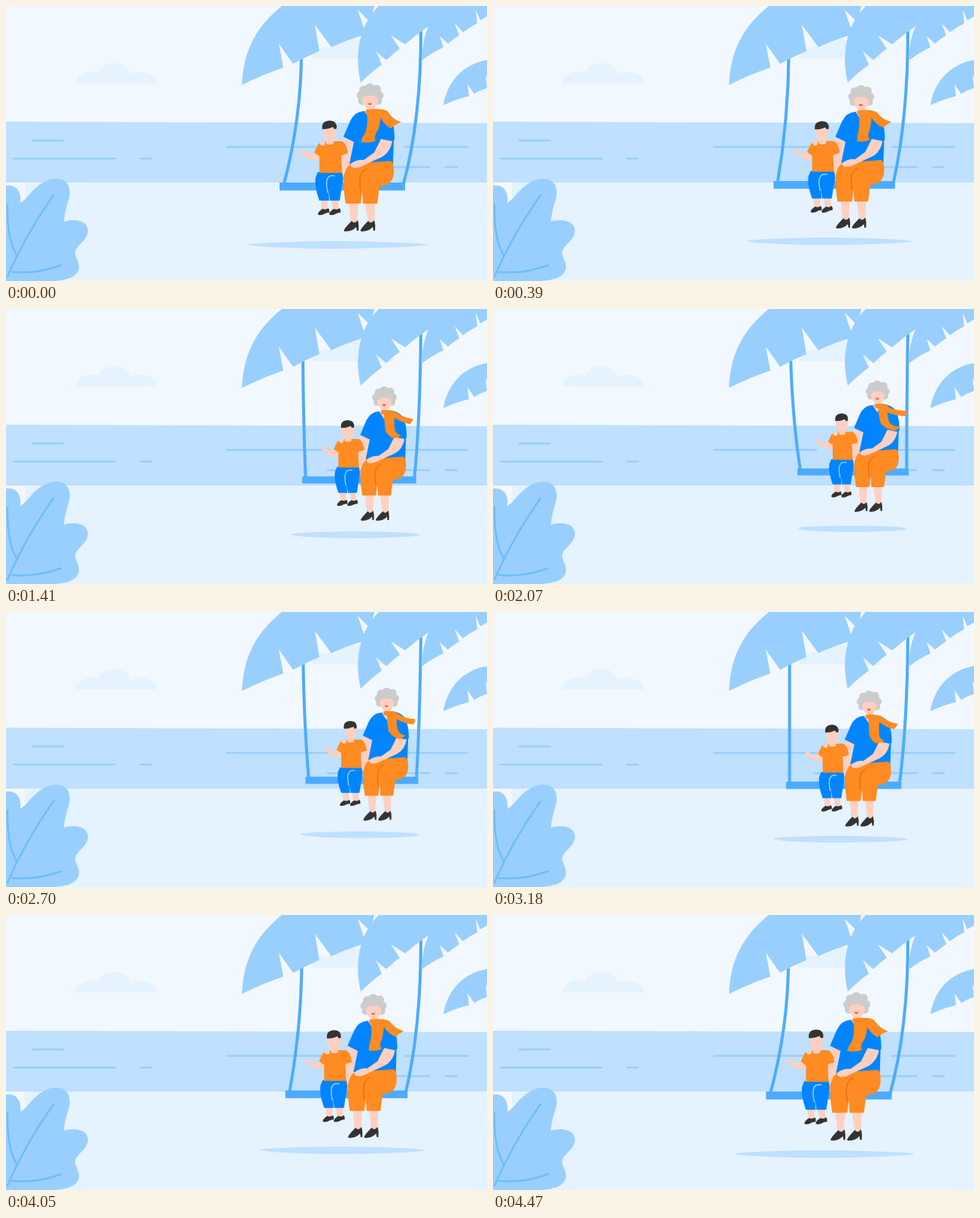
Write an HTML page that moves like this. It is 640x366 px and loops after 4.5 s.

```html
<!DOCTYPE html>
<html lang="en">
<head>
<meta charset="utf-8">
<title>Swing by the sea</title>
<style>
html, body { margin: 0; width: 100%; height: 100%; overflow: hidden; background: #f2f8ff; }
svg { display: block; width: 640px; height: 366px; }
.line { fill: none; stroke-linecap: round; stroke-width: 2.5; }
.sand { fill: #e5f2ff; }
.sea { fill: #bfe0ff; }
.leaf { fill: #99cfff; }
.rope { fill: none; stroke: #4dabff; stroke-width: 4; }
.skin { fill: #ffd0c0; }
.blue { fill: #0085ff; }
.orange { fill: #ff8b22; }
.dark { fill: #333; }
.grey { fill: #ccc; }
</style>
</head>
<body>
<svg viewBox="0 0 640 366">
  <defs>
    <path id="cloud" class="sand" d="M92 103Q94 93 102 90Q113 84 122 90Q128 76 144 76Q161 76 166 91Q176 85 187 89Q200 92 201 103Z"/>
    <path id="pump" class="dark" d="M450 298Q451 295 460 286Q464 291 468 285Q470 291 469 299H467L466 294Q461 300 452 300Q449 300 450 298Z"/>
    <path id="shoe" class="dark" d="M415 277Q415 274 421 270Q426 272 429 269Q431 272 430 275Q427 275 425 276Q420 279 416 278Z"/>
  </defs>

  <use href="#cloud"/>
  <use href="#cloud" x="315" y="-33"/>
  <path class="sea" d="M0 154L640 156V235H0Z"/>
  <path class="sand" d="M25 235H640V366H0V262H25Z"/>
  <path class="line" stroke="#99cfff" d="M35 179H76M10 203H145M179 203H193M294 187.500H430M531 187.500H614M428 214.500H563M585 214.500H600"/>

  <path id="shadow" class="sea"/>
  <path id="ropeL" class="rope"/>
  <path id="ropeR" class="rope"/>

  <g class="leaf">
    <path d="M314 105C316 60 332 28 367 0H490L485 22L468 5L479 38Q455 44 433 55L411 25L417 60Q400 67 382 77L363 50L369 82Q342 91 314 105Z"/>
    <path d="M472 102C463 65 470 25 496 0H640V14L631 19L625 5L627 23Q617 28 608 35L597 23L603 39Q595 44 588 50L577 40L582 55Q567 62 554 72Q553 48 562 27Q546 38 531 51L512 39L524 57Q515 63 506 72L492 60L500 78Q486 88 472 102Z"/>
    <path d="M582 132C587 101 608 77 640 72V96L638 92L640 109Q631 112 623 117L614 104L616 120Q599 124 582 132Z"/>
    <path d="M0 239C14 237 21 247 19 262C29 257 38 237 58 231C80 225 89 240 83 259Q78 274 77 287C92 282 109 286 109 299C108 314 92 318 92 329C93 337 98 341 97 349C95 361 82 364 66 366H0Z"/>
  </g>
  <path class="line" stroke="#70bcff" d="M63 252Q25 306 2 360M2 264Q1 311 15 333M8 354Q41 357 73 345"/>

  <!-- Drawn at its largest, with the seat's left end at 364,240 -->
  <g id="swing">
    <path fill="#4dabff" d="M364 235H531V245.500H364Z"/>

    <path class="skin" d="M450 174L463 180L458 196L464 210L455 218L447 227L445 223L451 205Z"/>
    <path class="skin" d="M456 262H469L467 289Q463 294 459 289ZM478 262H491L490 289Q486 294 482 289Z"/>
    <use href="#pump"/>
    <use href="#pump" x="22"/>
    <path class="blue" d="M475 140Q464 141 458 153L449 174L463 181L457 210H515L516 179L517 178Q517 154 509 145Q502 139 492 138Z"/>
    <path class="orange" d="M459 210Q451 215 449 229Q449 247 452 263H472L474 246L475 263H494L497 240C512 239 517 231 516 216Q516 209 512 206Z"/>
    <path class="line" stroke="#e5740f" style="stroke-width:1.500" d="M472 248C469 229 471 221 480 217"/>
    <path class="skin" d="M499 177L514 180Q511 195 500 201L476 212Q468 217 461 215Q456 213 460 209Q468 204 476 205L490 195Z"/>
    <path class="skin" d="M479 131H490V140L484 151L477 140L480 138Z"/>
    <g class="grey">
      <circle cx="484.500" cy="117" r="12"/><circle cx="484" cy="110" r="7"/><circle cx="476" cy="112" r="6"/>
      <circle cx="493" cy="111" r="6"/><circle cx="472" cy="119" r="5.500"/><circle cx="497" cy="119" r="5.500"/>
      <circle cx="474" cy="126" r="5.500"/><circle cx="495" cy="126" r="5.500"/>
    </g>
    <path class="skin" d="M474 124Q477 119 484 119Q492 119 495 124Q495 136 485 137Q475 136 474 124Z"/>
    <path fill="#ee5a3c" d="M481 129Q484 130 487 129Q486 132 484 132Q482 132 481 129Z"/>
    <path id="tail" class="orange"/>
    <path id="wing" class="orange"/>

    <path class="skin" d="M418 204Q410 207 404 204L394 198Q391 194 393 192Q397 191 400 195L408 198L411 191L420 195Z"/>
    <path class="skin" d="M446 196L455 194Q456 210 449 226Q446 230 444 226L447 211Z"/>
    <path class="skin" d="M419 258H428V271Q423 274 420 271ZM433 258H442L443 270Q438 274 435 271Z"/>
    <use href="#shoe"/>
    <use href="#shoe" x="15"/>
    <path class="blue" d="M415 221H447Q450 230 447 239L444 259H431L429 245L430 259H417Q410 240 412 228Z"/>
    <path class="line" stroke="#99cfff" style="stroke-width:1.500" d="M437 226C426 224 425 234 428 248"/>
    <path class="orange" d="M422 180Q416 181 414 187L410 195L417 200V222H447L446 199L455 196Q453 183 447 180Z"/>
    <path class="skin" d="M417 183Q419 179 425 180L424 185Q420 188 417 183Z"/>
    <path class="skin" d="M422 161H440Q440 175 436 178V183Q431 186 426 183V178Q421 174 422 161Z"/>
    <path class="dark" d="M421 164Q419 153 431 152.500Q441 153 440 163L437 164L435 161Q429 164 421 164Z"/>
  </g>
</svg>
<script>
const PERIOD = 4500, STEP = 30;
const $ = id => document.getElementById(id);
const setPath = (id, d) => $(id).setAttribute('d', d);

// Blends two paths that share the same commands.
function blend(a, b, k) {
  const ends = b.match(/\d+/g);
  return a.replace(/\d+/g, n => +n + (ends.shift() - n) * k);
}

// Runs 0 to 1 and back at even speed; low and high are the turning times.
function triangle(t, low, high) {
  const p = (t - low + PERIOD) % PERIOD, rise = high - low;
  return p < rise ? p / rise : (PERIOD - p) / (PERIOD - rise);
}

const tailBack = 'M479 139Q489 137 499 140Q499 153 495 165Q488 173 491 180Q482 183 471 181Q473 175 478 168Q483 155 479 139Z';
const tailFront = 'M482 139Q492 137 501 140Q497 152 502 165Q506 171 518 172Q516 177 512 178Q500 178 490 168Q485 155 486 143Z';
const wingBack = 'M479 138Q500 135 508 140Q514 151 526 155Q517 158 512 163Q502 158 497 146Q488 145 479 143Z';
const wingFront = 'M480 138Q489 137 500 143Q511 148 526 148Q531 151 527 156Q515 156 502 152Q490 147 480 143Z';

function drawShadow(u) {
  const left = 321 + 91 * u, right = 562 - 24 * u + 12 * u * u;
  const y = 318.3 - 27.700 * u, mid = (left + right) / 2 - 6 * (1 - u);
  const h = 5 - u, reach = 40, flare = 18 * (1 - u);
  setPath('shadow', `M${left} ${y - 1}
    C${left + flare} ${y - 3} ${mid - reach} ${y - h} ${mid} ${y - h}
    S${right - flare / 2} ${y - 3} ${right} ${y}
    C${right - flare} ${y + 3} ${mid + reach} ${y + h} ${mid} ${y + h}
    S${left} ${y + 2.500} ${left} ${y - 1}Z`);
}

function draw(t) {
  drawShadow(triangle(t, -30, 2220));

  const w = triangle(t, -60, 2175);
  const x = 362.5 + 56 * w - 12 * w * w;
  const y = 240.5 - 8.100 * w - 17.400 * w * w;
  const size = 1.005 - 0.2 * w + 0.08 * w * w;
  $('swing').setAttribute('transform', `translate(${x} ${y}) scale(${size}) translate(-364 -240.3)`);

  setPath('ropeL', `M${393 + 3 * w} 60Q${393 + 6 * w * w} 150 ${x + 5 * size} ${y}`);
  setPath('ropeR', `M552 28Q${553 - 3 * w} 150 ${x + 164 * size} ${y}`);
  setPath('tail', blend(tailBack, tailFront, w));
  setPath('wing', blend(wingBack, wingFront, w));
}

const start = performance.now();
function tick() {
  const t = (performance.now() - start) % PERIOD;
  draw(Math.floor(t / STEP) * STEP);
  requestAnimationFrame(tick);
}
tick();
</script>
</body>
</html>
```
